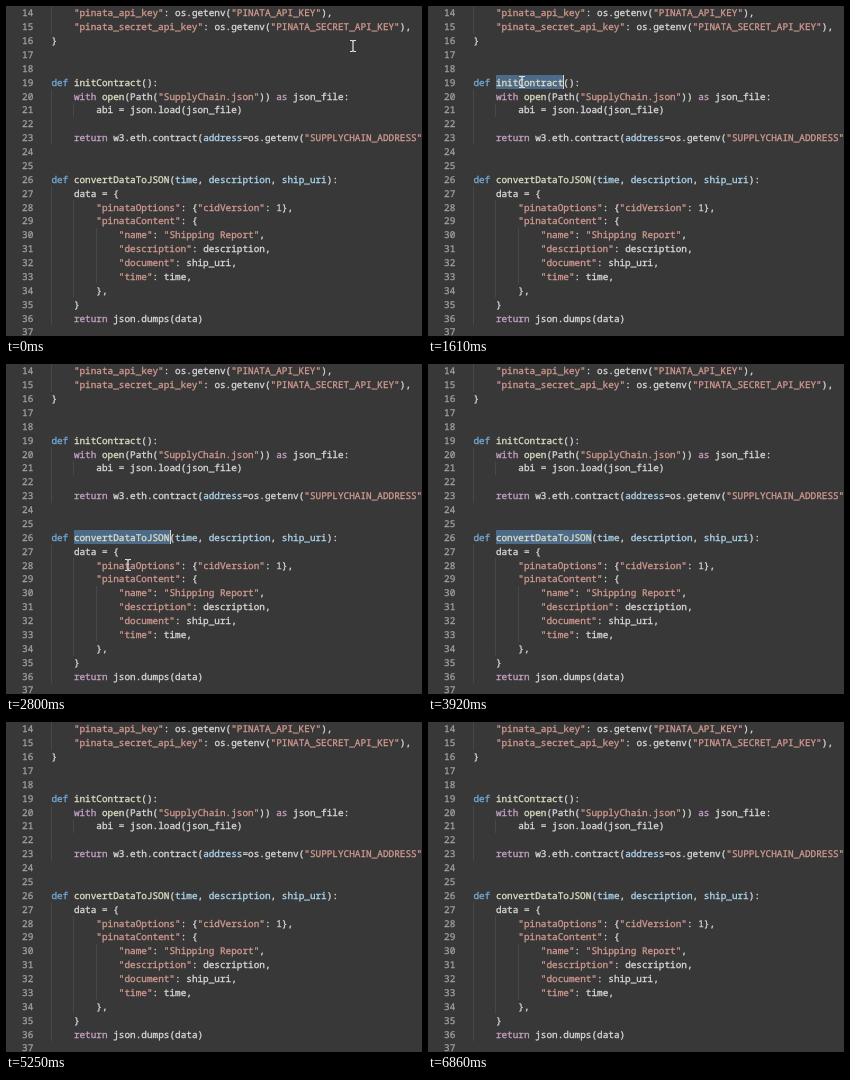
These frames come from a looping animation (416x330 px, 6930 ms). An HTML page:

```html
<!DOCTYPE html>
<html lang="en">
<head>
<meta charset="utf-8">
<style>
  html, body { margin: 0; width: 100%; height: 100%; overflow: hidden; background: #383838; }
  svg { display: block; }
  text { font: 9.37px "Noto Sans Mono", "DejaVu Sans Mono", monospace; text-rendering: geometricPrecision; white-space: pre; stroke-width: .3; }
</style>
</head>
<body>
<svg width="416" height="330" viewBox="0 0 416 330">
  <g id="guides" stroke="#484848"></g>
  <rect id="selection" x="68" height="14" fill="#4d6b89"/>
  <g id="code"></g>
  <rect id="caret" width="1" height="14" fill="#d8d8d8"/>
  <path id="mouse" d="M-3-5.5H-1L0-4.5L1-5.5H3M0-4.5V4.5M-3 5.5H-1L0 4.5L1 5.5H3" fill="none" stroke="#e2e2e2" stroke-width="1.2"/>
</svg>
<script>
const LOOP = 6930, STEP = 70, FIRST = 14, PITCH = 5.62, ROW = 13.87, LEFT = 45.4;
const source = `    "pinata_api_key": os.getenv("PINATA_API_KEY"),
    "pinata_secret_api_key": os.getenv("PINATA_SECRET_API_KEY"),
}


def initContract():
    with open(Path("SupplyChain.json")) as json_file:
        abi = json.load(json_file)

    return w3.eth.contract(address=os.getenv("SUPPLYCHAIN_ADDRESS"


def convertDataToJSON(time, description, ship_uri):
    data = {
        "pinataOptions": {"cidVersion": 1},
        "pinataContent": {
            "name": "Shipping Report",
            "description": description,
            "document": ship_uri,
            "time": time,
        },
    }
    return json.dumps(data)
`;

const $ = id => document.getElementById(id);
const colX = col => LEFT + col * PITCH;
const rowY = line => 7 + (line - FIRST) * ROW;

function place(el, attrs) {
  for (const key in attrs) el.setAttribute(key, attrs[key]);
}

function add(parent, tag, attrs, text = "") {
  const el = document.createElementNS("http://www.w3.org/2000/svg", tag);
  place(el, attrs);
  el.textContent = text;
  $(parent).append(el);
}

function write(text, x, y, color, anchor = "start") {
  add("code", "text", { x, y, fill: color, stroke: color, "text-anchor": anchor }, text);
}

// One capture group per colour; anything else is plain.
const token = /("[^"]*")|\b(def)\b|\b(with|as|return)\b|\b(open|initContract|convertDataToJSON)\b|\b(address(?==)|(?:time|description|ship_uri)(?=(?:, .*)?\):$))|\b(\d+)\b|\w+|[^\w\s"]+/g;
const colors = ["#d19a90", "#74abd8", "#c6a2c4", "#dfdfc4", "#add6ee", "#c3d0ba"];

source.split("\n").forEach((row, i) => {
  const y = rowY(FIRST + i) + 3.4;
  write(FIRST + i, 27.3, y, "#a0a0a0", "end");
  for (const m of row.matchAll(token)) {
    const kind = m.slice(1).findIndex(Boolean);
    write(m[0], colX(m.index), y, colors[kind] || "#dadada");
  }
});

// Indent guides: column, first line, last line
for (const [col, from, to] of [[0, 14, 15], [0, 20, 23], [4, 21, 21], [0, 27, 36], [4, 28, 34], [8, 30, 33]]) {
  const x = Math.floor(colX(col)) + 0.5;
  add("guides", "path", { d: `M${x} ${rowY(from) - ROW / 2}V${rowY(to) + ROW / 2}` });
}

// Pointer path: time, x, y
const path = [[0, 347, 40], [140, 347, 40], [700, 94, 76], [1680, 94, 76], [2170, 117, 171],
  [2450, 117, 171], [2800, 122, 201], [3430, 122, 205], [3780, 126, 340]];
// Double-clicked words: start, end, line, length
const picks = [[1260, 2400, 19, 12], [2400, 4620, 26, 17]];

function pointer(t) {
  const i = path.findIndex(p => p[0] > t);
  if (i < 0) return path.at(-1).slice(1);
  const [a, b] = [path[i - 1], path[i]];
  const u = (t - a[0]) / (b[0] - a[0]), ease = u * u * (3 - 2 * u);
  return [1, 2].map(k => a[k] + (b[k] - a[k]) * ease);
}

function draw(now) {
  const t = Math.floor(now % LOOP / STEP) * STEP;
  place($("mouse"), { transform: `translate(${pointer(t)})` });
  const pick = picks.find(p => t >= p[0] && t < p[1]);
  $("selection").style.display = pick ? "" : "none";
  $("caret").style.display = pick && (t - pick[0]) % 1000 < 500 ? "" : "none";
  if (pick) {
    const y = Math.round(rowY(pick[2]) - 7), width = Math.round(pick[3] * PITCH);
    place($("selection"), { y, width });
    place($("caret"), { x: 68 + width, y });
  }
  requestAnimationFrame(draw);
}
requestAnimationFrame(draw);
</script>
</body>
</html>
```
